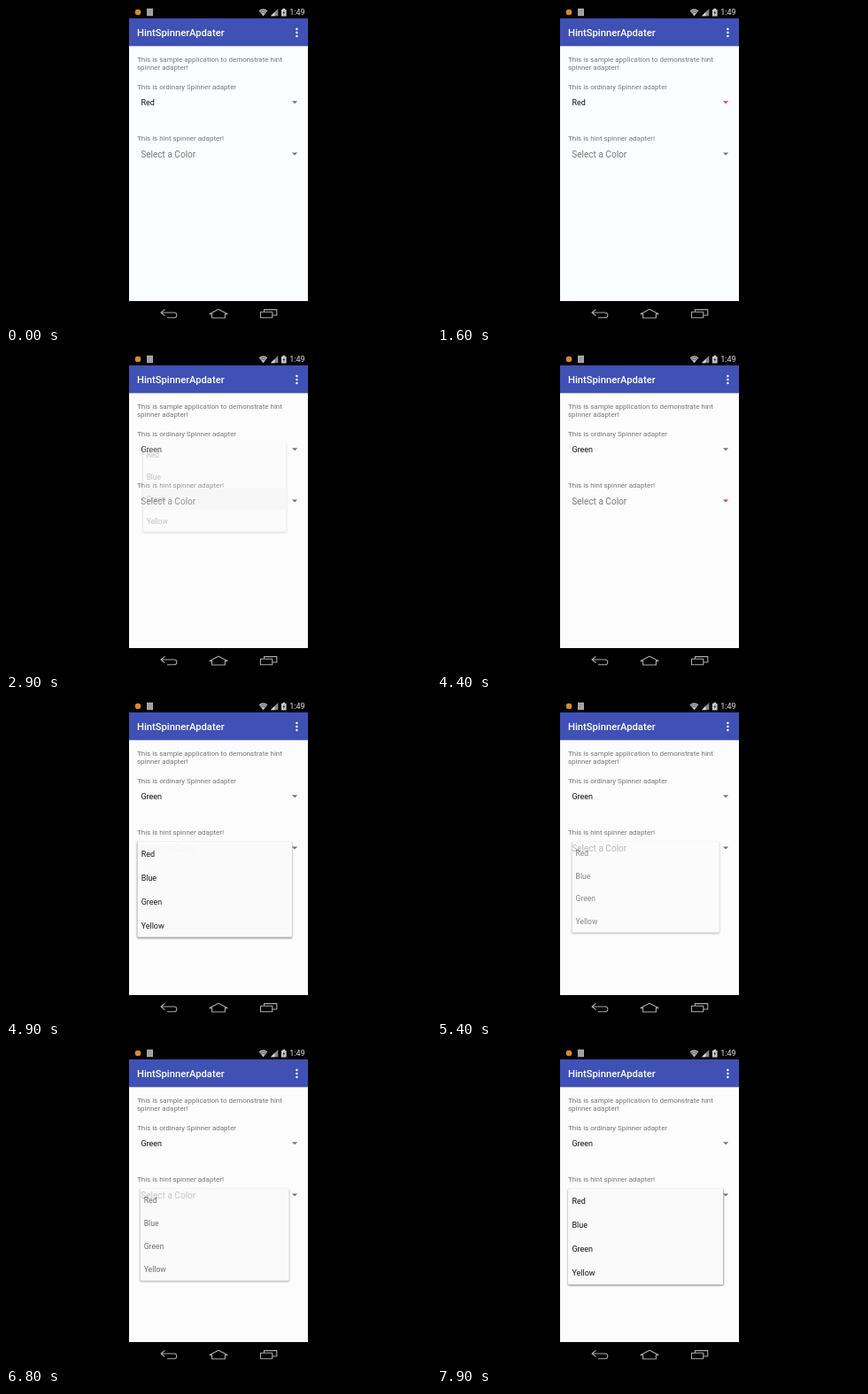
Write an HTML page that moves like this. It is 480 px wide and 360 px high and loops after 8000 ms.

```html
<!DOCTYPE html>
<html lang="en">
<head>
<meta charset="utf-8">
<title>Spinner demo</title>
<style>
  html, body { margin: 0; width: 100%; height: 100%; overflow: hidden; background: #000; }
  svg { display: block; width: 480px; height: 360px; font-family: Roboto, sans-serif; }
  .title { font-size: 11.2px; font-weight: 500; fill: #fff; }
  .label { font-size: 7.97px; fill: #757575; }
  .hint { font-size: 10.08px; fill: #787878; }
  .item { font-size: 9px; fill: #111; }
  .clock { font-size: 9px; fill: #ddd; }
  .nav { fill: none; stroke: #aaa; stroke-width: 1.1; stroke-linejoin: round; }
  .card { fill: #fafafa; filter: drop-shadow(0 0 .6px rgba(0,0,0,.55)) drop-shadow(0 1.4px 1.3px rgba(0,0,0,.5)); }
</style>
</head>
<body>
<svg viewBox="0 0 480 360">
  <rect width="480" height="360"/>

  <!-- status bar -->
  <circle cx="149" cy="7" r="3.3" fill="#d98a28"/>
  <rect x="159" y="2.8" width="7" height="8.4" fill="#aaa"/>
  <path d="M160 5h5M160 7h5M160 9h5" stroke="#888" stroke-width=".6"/>
  <path d="M285.6 5.2Q290.5 1.4 295.4 5.2L290.5 11.4Z" fill="#bbb"/>
  <path d="M286.8 6.3Q290.5 3.7 294.2 6.3M288.2 8Q290.5 6.4 292.8 8" fill="none" stroke="#333" stroke-width=".7"/>
  <path d="M299 11.3L307.3 3V11.3Z" fill="#888"/>
  <path d="M299 11.3L303.5 6.8V11.3Z" fill="#ddd"/>
  <path d="M311 4h1.5v-1.3h2.6V4h1.5v7.4H311Z" fill="#ccc"/>
  <path d="M314.5 4.8l-2 3.2h1.2l-.6 2.5 2.2-3.3h-1.3Z" fill="#222"/>
  <text class="clock" x="320.3" y="10.4">1:49</text>

  <!-- app -->
  <rect id="page" x="139" y="45" width="202" height="288"/>
  <rect x="139" y="14" width="202" height="31.3" fill="#3f51b5"/>
  <text class="title" x="148" y="34.2">HintSpinnerApdater</text>
  <g fill="#fff">
    <circle cx="328.4" cy="26" r="1.2"/><circle cx="328.4" cy="30" r="1.2"/><circle cx="328.4" cy="34" r="1.2"/>
  </g>
  <g class="label">
    <text x="148" y="62.8">This is sample application to demonstrate hint</text>
    <text x="148" y="72.2">spinner adapter!</text>
    <text x="148" y="94.2">This is ordinary Spinner adapter</text>
    <text x="148" y="152.2">This is hint spinner adapter!</text>
  </g>
  <text id="choice" class="item" x="152.4" y="112.3"></text>
  <text class="hint" x="152.2" y="171">Select a Color</text>
  <path id="arrow1" d="M323 107.2h6.2l-3.1 3.1Z"/>
  <path id="arrow2" d="M323 165.4h6.2l-3.1 3.1Z"/>
  <g id="popup1"></g>
  <g id="popup2"></g>

  <!-- navigation bar -->
  <g class="nav">
    <path d="M179.5 342.3L175 346l4.5 3.7M175.4 346H189.500q3.300 0 3.300 2.900t-3.300 2.900H182"/>
    <path d="M230 347.600L240 342.300l10 5.300h-2.600v4.400h-14.800v-4.400Z"/>
    <path d="M287.500 345.200h13.300v6.600h-13.300ZM291.500 345v-2.400h14.300v6.400h-4.800"/>
  </g>
</svg>
<script>
const LOOP = 8000, FADE = 220, ROW = 27, CENTER = 235.5;
const $ = id => document.getElementById(id);
const colors = ['Red', 'Blue', 'Green', 'Yellow'];
const between = (t, a, b) => t >= a && t < b;

// Decelerating 0..1 ramp starting at the given time
const ramp = (t, start) => {
  const x = Math.min(1, Math.max(0, (t - start) / FADE));
  return 1 - (1 - x) ** 2;
};

function fillPopup(id, top) {
  $(id).innerHTML =
    `<rect class="card" x="148" y="${top}" width="175.3" height="${4 * ROW}" rx=".8"/>` +
    colors.map((name, i) =>
      `<rect class="row" x="148" y="${top + i * ROW}" width="175.3" height="${ROW}" fill="none"/>` +
      `<text class="item" x="152.4" y="${top + i * ROW + 16.9}">${name}</text>`).join('');
}

function showPopup(id, top, shown) {
  const scale = 0.9 + 0.1 * shown;
  $(id).setAttribute('opacity', shown);
  $(id).setAttribute('transform',
    `translate(${CENTER} ${top}) scale(${scale}) translate(${-CENTER} ${-top})`);
}

const paint = (el, color) => el.setAttribute('fill', color);
const arrowColor = pressed => pressed ? '#dc3a62' : '#737373';

function draw(t) {
  paint($('page'), t < 1820 ? '#fbfefe' : '#fcfcfc');
  $('choice').textContent = t < 2790 ? 'Red' : 'Green';
  paint($('arrow1'), arrowColor(between(t, 1600, 1820)));
  paint($('arrow2'), arrowColor(between(t, 4400, 4720) || between(t, 6500, 6720)));
  paint(greenRow, between(t, 2600, 3100) ? '#ebebeb' : 'none');
  showPopup('popup1', 102, ramp(t, 1820) - ramp(t, 2790));
  showPopup('popup2', 160, ramp(t, 4720) - ramp(t, 5336) + ramp(t, 6720));
}

fillPopup('popup1', 102);
fillPopup('popup2', 160);
const greenRow = $('popup1').querySelectorAll('.row')[2];

function tick() {
  draw(performance.now() % LOOP);
  requestAnimationFrame(tick);
}
tick();
</script>
</body>
</html>
```
